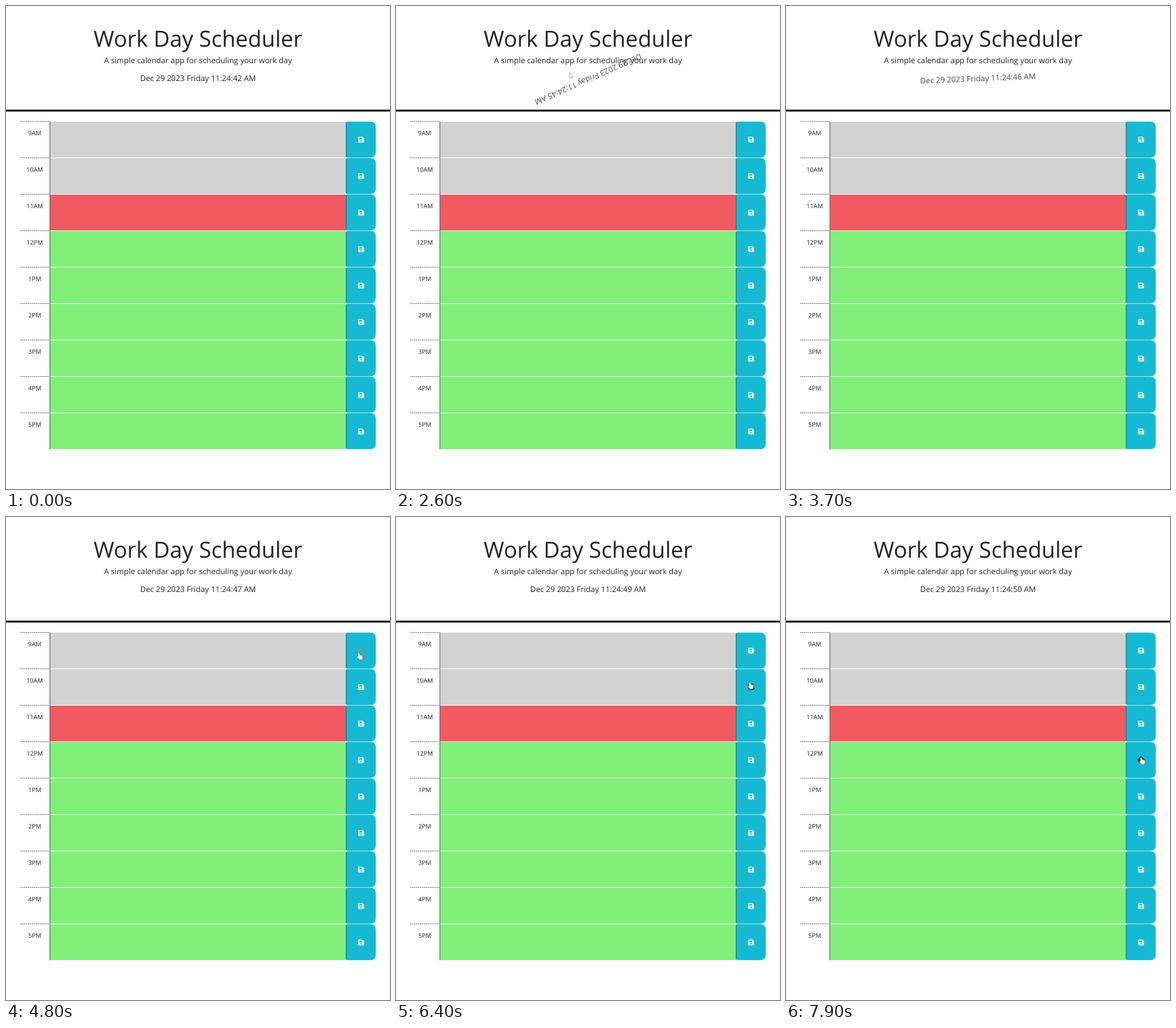
An HTML page that plays this animation: 538x676 px, repeating every 8000 ms.

```html
<!DOCTYPE html>
<html lang="en">
<head>
<meta charset="utf-8">
<title>Work Day Scheduler</title>
<style>
  html, body { margin: 0; width: 100%; height: 100%; overflow: hidden; background: #fff; }
  svg { display: block; width: 538px; height: 676px; }
  text {
    font-family: "Open Sans", "Noto Sans", sans-serif; font-size: 10.93px; fill: #222;
    text-anchor: middle; text-rendering: geometricPrecision;
  }
  .title { font-size: 31.12px; }
  .hour { font-size: 8.74px; }
</style>
</head>
<body>
<svg viewBox="0 0 538 676">
  <defs>
    <path id="disk" fill-rule="evenodd" d="M-4-4H2L4-2V4H-4ZM-2.7-2.8V-.6H1.7V-2.8ZM0 .4a1.2 1.2 0 1 0 .01 0Z"
      stroke-linejoin="round"/>
    <path id="arrow" d="M0 0V8L1.8 6.4L3 9L4 8.5L3 6H4.8Z" fill="#fff" stroke="#777" stroke-width=".7"/>
    <path id="hand" d="M-1.6-5Q-.5-5.4-.2-4.4L.3-1.9L3.6-1.2Q4.6-.9 4.4.4L4 3.2V5H-1.4V4L-4 .8Q-3.6-.6-2.2.4L-2.4-4Z"
      fill="#fff" stroke="#244" stroke-width=".5"/>
  </defs>
  <text class="title" x="269" y="56.7">Work Day Scheduler</text>
  <text x="269" y="80">A simple calendar app for scheduling your work day</text>
  <text id="date" x="269" y="105.3"></text>
  <rect y="145" width="538" height="2.8" fill="#212325"/>
  <g id="rows"></g>
  <use id="cursor"/>
</svg>
<script>
const LOOP = 8000, STEP = 100, TOP = 161.45, PITCH = 51.06;
const $ = id => document.getElementById(id);
const clamp = (v, lo, hi) => Math.min(hi, Math.max(lo, v));
const set = (el, attrs) => Object.entries(attrs).forEach(([k, v]) => el.setAttribute(k, v));

function row(i) {
  const exact = TOP + i * PITCH, y = Math.floor(exact);
  const hour = (i + 8) % 12 + 1, half = i < 3 ? "AM" : "PM";
  const fill = i < 2 ? "#d2d2d2" : i == 2 ? "#f15a61" : "#80f07a";
  return `<path d="M20 ${y + .5}H61" stroke="#444" stroke-width=".8" stroke-dasharray="1.7 1"/>
    <text class="hour" x="40.3" y="${exact + 19.2}">${hour}${half}</text>
    <rect x="62" y="${y + 1}" width="414.5" height="50.2" fill="${fill}"/>
    <path d="M61.5 ${y + .5}v51" stroke="#555" stroke-width=".9"/>
    <path d="M478 ${y + .7}h32.5q7.5 0 7.5 7.5v35.6q0 7.5-7.5 7.5H478q-1.5 0-1.5-1.5V${y + 2.2}q0-1.5 1.5-1.5Z" fill="#15bad2"/>
    <path d="M476.6 ${y + 2}v48" stroke="#1d626b" stroke-width=".9"/>
    <use href="#disk" class="icon"/>`;
}
$("rows").innerHTML = Array.from({ length: 9 }, (_, i) => row(i)).join("");
const icons = [...document.querySelectorAll(".icon")];

function drawDate(t) {
  const sec = t < 200 ? 42 : 43 + Math.max(0, Math.floor((t - 300) / 1000));
  const s = (t - 1900) / 1000;
  const angle = s < -.25 ? 0 : clamp(39 + 161.6 * s + 8.6 * s * s, 0, 360);
  const date = $("date");
  date.textContent = `Dec 29 2023 Friday 11:24:${sec} AM`;
  set(date, { transform: `rotate(${angle} 269 102)`, opacity: angle % 360 ? .82 : 1 });
}

// A hovered icon spins and fades from white to black.
function drawIcons(t) {
  const hovered = t < 4650 ? -1 : Math.max(0, Math.floor((t - 5000) / 800));
  icons.forEach((icon, i) => {
    const age = i == hovered ? t - (i ? 5000 + 800 * i : 4650) : 0;
    const tone = 255 - 225 * Math.min(1, age / 300);
    set(icon, {
      transform: `translate(497.5 ${TOP + i * PITCH + 25.6}) rotate(${Math.min(360, age * .27)})`,
      fill: `rgb(${tone},${tone},${tone})`
    });
  });
}

// The arrow crosses the header; the hand then steps down the buttons.
function drawCursor(t) {
  const onButton = t >= 4800, s = (t - 1900) / 1000;
  const n = Math.max(0, (t - 5600) / 800);
  const at = Math.floor(n) + Math.min(1, 2 * (n % 1));
  const x = onButton ? 495.5 + 1.1 * at : 128 + 165 * s;
  const y = onButton ? (at < 1 ? 195 + 41 * at : 183.3 + 52.7 * at) : 129.5 - 53 * s;
  set($("cursor"), {
    href: onButton ? "#hand" : "#arrow",
    transform: `translate(${x} ${y})`,
    opacity: onButton ? 1 : t >= 1600 && t < 3400 ? .7 : 0
  });
}

const start = performance.now();
function frame() {
  const elapsed = (performance.now() - start) % LOOP;
  const t = Math.floor(elapsed / STEP) * STEP;
  drawDate(t);
  drawIcons(t);
  drawCursor(t);
  requestAnimationFrame(frame);
}
frame();
</script>
</body>
</html>
```
